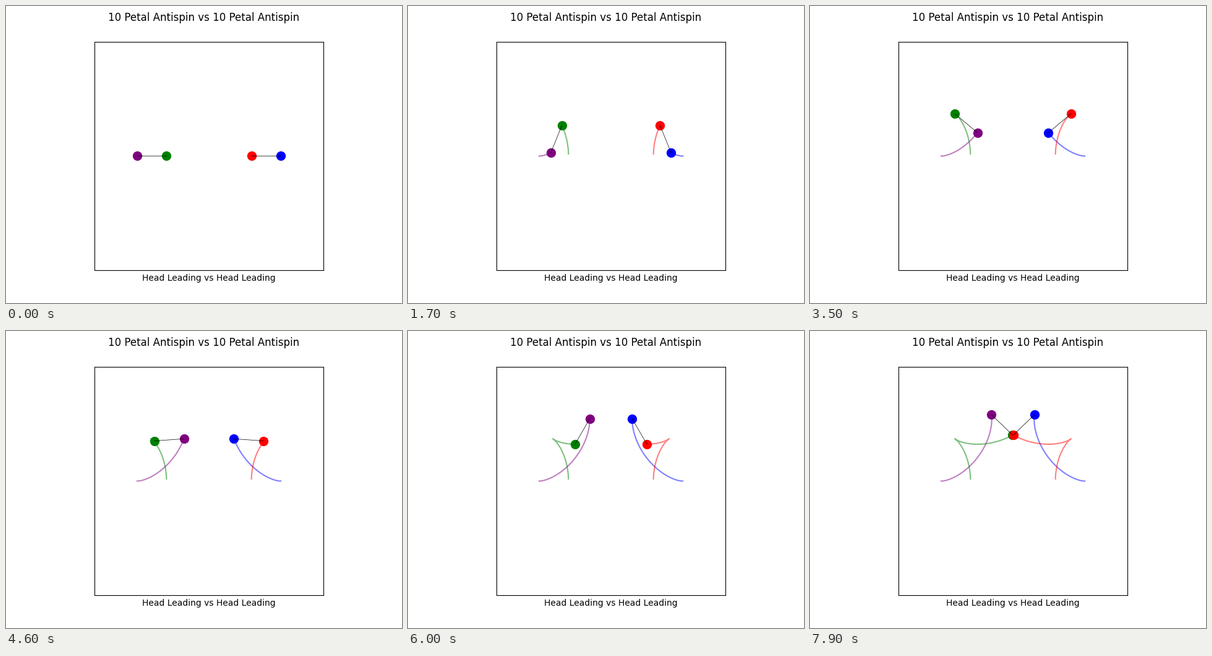
A matplotlib script that plays this animation: 640x480 px, repeating every 8 s.

```python
import numpy as np
import matplotlib.pyplot as plt
from matplotlib.animation import FuncAnimation

FRAMES, INTERVAL = 80, 100
HAND, STAFF, SPIN = 1.0, 0.2575, -4  # hand radius, half staff, turns per orbit

theta = np.radians(np.arange(FRAMES))
hand = HAND * np.exp(1j * theta)
arm = STAFF * np.exp(1j * SPIN * theta)
blue, red = hand + arm, hand - arm


def mirror(path):
    return -path.conj()


paths = {
    "purple": mirror(blue),
    "green": mirror(red),
    "blue": blue,
    "red": red,
}
rods = [("purple", "green"), ("blue", "red")]

fig, ax = plt.subplots(figsize=(6.4, 4.8), dpi=100)
fig.suptitle("10 Petal Antispin vs 10 Petal Antispin")
ax.set(xlim=(-2, 2), ylim=(-2, 2), xticks=[], yticks=[], aspect="equal",
       xlabel="Head Leading vs Head Leading")

trails = {c: ax.plot([], [], color=c, lw=1.5, alpha=0.5)[0] for c in paths}
heads = {c: ax.plot([], [], "o", color=c, ms=10)[0] for c in paths}
sticks = [ax.plot([], [], color="black", lw=0.5)[0] for _ in rods]


def place(line, points):
    line.set_data(points.real, points.imag)


def update(i):
    for c, path in paths.items():
        place(trails[c], path[1:i + 1])
        place(heads[c], path[i:i + 1])
    for stick, (a, b) in zip(sticks, rods):
        place(stick, np.array([paths[a][i], paths[b][i]]))
    return [*trails.values(), *heads.values(), *sticks]


anim = FuncAnimation(fig, update, frames=FRAMES, interval=INTERVAL,
                     init_func=lambda: update(0), repeat=True, repeat_delay=0)
plt.show()
```
